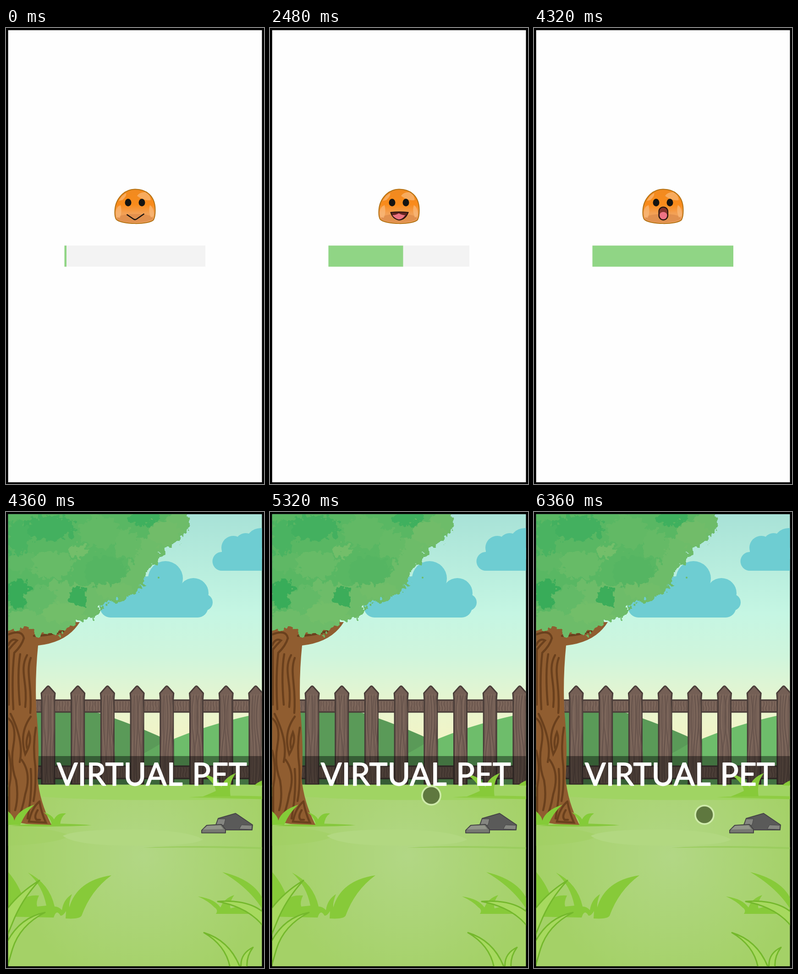
An HTML page for the animation above (6.4 s loop, 563 by 994 pixels).

```html
<!DOCTYPE html>
<html lang="en">
<head>
<meta charset="utf-8">
<title>Virtual pet</title>
<style>
html, body { margin: 0; width: 100%; height: 100%; overflow: hidden; background: #000; }
svg { display: block; width: 563px; height: 994px; }
.title { font: 400 67px Lato, "Open Sans", sans-serif; letter-spacing: .4px; word-spacing: 5px; }
</style>
</head>
<body>
<svg viewBox="0 0 563 994">
  <defs>
    <clipPath id="screen"><rect x="4.7" y="4.7" width="553.8" height="985.5"/></clipPath>
    <linearGradient id="sky" x1="0" y1="5" x2="0" y2="520" gradientUnits="userSpaceOnUse">
      <stop stop-color="#a8e2d7"/><stop offset=".42" stop-color="#c5f6e3"/>
      <stop offset=".6" stop-color="#cff5dc"/><stop offset=".8" stop-color="#e8f5cf"/><stop offset="1" stop-color="#f5f4c4"/>
    </linearGradient>
    <radialGradient id="lawn" cx="300" cy="750" r="290" gradientUnits="userSpaceOnUse">
      <stop stop-color="#b2d785"/><stop offset="1" stop-color="#a4d167"/>
    </radialGradient>
    <linearGradient id="skin" x1="0" y1="0" x2="0" y2="1">
      <stop stop-color="#f08a20"/><stop offset=".45" stop-color="#f98b1b"/>
      <stop offset=".7" stop-color="#f3a054"/><stop offset="1" stop-color="#efa565"/>
    </linearGradient>
    <filter id="leafy" x="-10%" y="-10%" width="120%" height="120%" color-interpolation-filters="sRGB">
      <feTurbulence type="fractalNoise" baseFrequency=".08" numOctaves="3" seed="4"/>
      <feDisplacementMap in="SourceGraphic" scale="32" xChannelSelector="R" yChannelSelector="G"/>
    </filter>
  </defs>

  <g clip-path="url(#screen)">
    <g id="loader">
      <rect width="563" height="994" fill="#fefefe"/>
      <rect x="127.5" y="474.3" width="307.5" height="46" fill="#f3f3f3"/>
      <rect id="fill" x="127.5" y="474.3" height="46" fill="#90d585"/>
      <path d="M237.5 400C238 372 258 352 281 351.500C306 351 325 366 325.500 395Q326 410 322 418C312 429 252 429 240.500 417Q237 411 237.500 400Z" fill="url(#skin)" stroke="#b47214" stroke-width="2"/>
      <path d="M242 416Q244 406 281 405.500Q318 405 321 416C308 427 254 427 242 416Z" fill="#dd8b4a" opacity=".75"/>
      <path d="M240 402Q240 390 250 386Q254 402 248 414L241 412ZM314 386Q324 392 322 410L316 413Q310 398 314 386ZM246 377Q253 364 262 360Q264 366 254 375ZM286 366Q292 357 304 358Q315 363 316 375Q302 378 286 366Z" fill="#fbbd80" opacity=".65"/>
      <ellipse cx="266.5" cy="380.500" rx="7" ry="8.200" fill="#141412"/>
      <ellipse cx="296.5" cy="380.500" rx="7" ry="8.200" fill="#141412"/>
      <g class="mouth"><path d="M263.5 406.500L279 417Q282 418.500 285 416.500L301.500 405" fill="none" stroke="#1b1510" stroke-width="2.600"/></g>
      <g class="mouth">
        <path d="M263.5 402Q282 400 301.500 402Q295 418 281 418.500Q268 416 263.500 402Z" fill="#652420" stroke="#23130e" stroke-width="2"/>
        <path d="M267 408Q274 408 281 404Q288 408 295 408Q289 417 281 417.500Q272 415 267 408Z" fill="#ec7382"/>
      </g>
      <g class="mouth">
        <rect x="272.5" y="390.300" width="19.500" height="28" rx="9.700" fill="#83332b" stroke="#24150f" stroke-width="2.200"/>
        <path d="M274 408Q275 401 282 401Q289 401 290.500 408Q290 416.500 282 417Q275 416.500 274 408Z" fill="#ee7385"/>
      </g>
    </g>

    <g id="garden">
      <rect width="563" height="600" fill="url(#sky)"/>
      <g fill="#6ecdd2">
        <circle cx="348" cy="145" r="38"/><circle cx="312" cy="172" r="32"/><circle cx="409" cy="177" r="33"/>
        <circle cx="433" cy="197" r="18"/><rect x="205" y="168" width="236" height="62" rx="23"/>
        <circle cx="471" cy="107.500" r="20.500"/><circle cx="496" cy="78" r="26"/><circle cx="523" cy="69" r="23"/>
        <circle cx="556" cy="69" r="34"/><rect x="471" y="78" width="100" height="50"/>
      </g>
      <path d="M60 425Q150 420 205 439Q276 462 352 497V600H60Z" fill="#5a9a58"/>
      <path d="M300 527Q400 470 563 437V600H300Z" fill="#6ebd6b"/>
      <path d="M296 530L344 501L368 497V600H296Z" fill="#62a95f"/>
      <g id="fence"></g>
      <rect x="65" y="532" width="500" height="64" opacity=".4"/>

      <rect y="594.500" width="563" height="400" fill="url(#lawn)"/>
      <path d="M0 594.500H563V626Q330 629 220 627Q130 625 70 620H0Z" fill="#a0d463"/>
      <path d="M0 684Q100 688 140 705Q120 722 0 728Z" fill="#a2d165" opacity=".6"/>
      <path d="M124 706Q150 692 278 692Q400 694 430 714Q405 728 290 727Q155 729 124 706Z" fill="#b2d881"/>
      <path d="M298 732Q400 725 563 731V735Q430 730 298 732Z" fill="#9bcd5f"/>
      <path d="M398 622Q470 616 563 620V626Q480 624 398 622Z" fill="#8fcd43"/>
      <g fill="#87ca39">
        <path d="M428 571Q460 575 470 601Q475 579 502 569Q485 590 490 620H430Q450 612 458 608Q455 589 428 571ZM542 596Q550 588 563 584V597Z"/>
        <path d="M5 785Q30 815 38 845Q48 834 72 836Q65 850 68 860L88 858Q80 815 48 786Q95 810 106 860Q115 860 122 868Q125 845 144 833Q137 850 138 862Q155 803 230 792Q185 825 165 880Q160 888 130 886L131 870Q125 880 119 880Q110 864 104 884L5 882Z"/>
        <path d="M419 838Q455 843 468 862Q476 842 498 835Q486 852 490 864Q508 858 523 863L558 867V876H458Q464 868 455 862Q442 848 419 838ZM472 785Q545 802 563 850V872Q535 822 472 785Z"/>
      </g>
      <g fill="#a7d95f" stroke="#74b82c" stroke-width="3" stroke-linejoin="round">
        <path d="M2 866Q30 829 73 803Q34 845 14 896L2 925ZM2 938Q30 884 85 873Q30 901 14 953L2 994Z"/>
        <path d="M462 849Q530 844 563 874V905Q530 862 462 849ZM432 917Q488 934 511 993H489Q480 945 432 917ZM539 949Q510 963 513 993H526Q524 969 539 949Z"/>
      </g>

      <g stroke="#464646" stroke-width="2" stroke-linejoin="round">
        <path d="M455 690L463 668L501 657L538 682L537 693H470Z" fill="#5a5a59"/>
        <path d="M457 687L463 669L479 669L476 682ZM509 691L514 682L537 683L536 692Z" fill="#858681" stroke-width="1"/>
        <path d="M427 694L438 683L470 681L479 692V699.500H427Z" fill="#767871"/>
        <path d="M430 692L439 684L468 683L474 691Z" fill="#92958a" stroke="none"/>
      </g>

      <path d="M8 684Q100 675 187 683Q100 688 8 684Z" fill="#86c83d"/>
      <path d="M0 240H161Q134 284 70 291Q63 360 66 430Q74 510 69 580Q73 630 99 682L45 680L0 672Z" fill="#905d30"/>
      <g fill="none" stroke="#6a401d" stroke-width="4.500" stroke-linecap="round">
        <path d="M5 267Q35 255 39 275Q34 292 18 307Q12 360 16 430M5 290Q12 274 24 280Q14 290 6 300V420M61 270Q90 270 125 260"/>
        <path d="M46 312C28 345 48 370 42 425M54 318C42 350 58 380 53 438M31 310Q24 350 30 420"/>
        <path d="M5 450Q24 465 16 510Q9 550 22 585Q28 620 20 650M10 440Q40 500 30 545M54 446Q28 482 42 528Q58 500 50 480Q42 500 46 515"/>
        <path d="M65 470Q58 510 64 555Q66 600 60 630M34 540Q56 570 42 615Q36 650 25 672M5 520Q15 560 7 600V655M54 560Q58 610 47 668M73 631Q56 645 50 675L87 677Q77 655 73 631M69 650Q60 665 67 671L74 671"/>
      </g>
      <path d="M2 650Q18 664 18 673Q25 650 62 638Q42 655 31 682H2ZM82 654Q100 660 105 670Q112 655 131 657Q119 665 118 682H100Q98 667 82 654Z" fill="#84cb38"/>

      <g filter="url(#leafy)">
        <path d="M-30 -30H392L402 28L382 58L350 82L330 95L334 112L304 126L305 157L268 186L218 200L195 228L158 238L120 264L72 271L52 254L-30 260Z" fill="#6dbc69"/>
        <path d="M-30 -30H350L354 40L290 60L262 142L180 160L100 150L45 215L-30 220Z" fill="#59b763"/>
        <g id="leaves"></g>
      </g>
      <circle cx="333" cy="143" r="2" fill="#6dbc69"/>
      <text class="title" x="318.5" y="596" text-anchor="middle" fill="#fff" stroke="#fff" stroke-width="1.800" stroke-linejoin="round">VIRTUAL PET</text>
    </g>
  </g>
  <g id="pointer">
    <circle r="22" fill="#d5efb3" opacity=".85"/>
    <circle r="18.300" fill="#5f783f"/>
  </g>
</svg>
<script>
const $ = id => document.getElementById(id);
const LOOP = 6400, GARDEN_AT = 4340, POINTER_AT = 4800;

let seed = 7;
const rand = (a, b) => {
  seed = seed * 16807 % 2147483647;
  return a + (b - a) * seed / 2147483647;
};

const grain = (x, y, h, sway) => {
  const s = rand(-sway, sway);
  return `M${x} ${y}q${s} ${h / 4} 0 ${h / 2}t0 ${h / 2}`;
};

function buildFence() {
  const edge = 'stroke="#493c38" stroke-width="3" stroke-linejoin="round"';
  const lines = (d, color) => `<path d="${d}" fill="none" stroke="${color}" stroke-width="2.2" opacity=".6"/>`;
  let out = '';
  for (const [y, h] of [[410, 26], [554, 27]]) {
    out += `<rect x="50" y="${y}" width="530" height="${h}" fill="#756056" ${edge}/>`;
    let light = '', dark = '';
    for (let x = 66; x < 560; x += 6) {
      light += grain(x, y + 3, h - 6, 3);
      dark += grain(x + 3, y + 3, h - 6, 3);
    }
    out += lines(light, '#877063') + lines(dark, '#66534a');
  }
  for (let i = 0; i < 8; i++) {
    const x = 92 + i * 64.7;
    out += `<path d="M${x - 15} 395L${x - 3} 381.500Q${x} 377.500 ${x + 3} 381.500L${x + 15} 395L${x + 14} 408V594H${x - 14}V408Z" fill="#745f55" ${edge}/>`;
    let light = '', dark = '';
    for (let k = -9; k <= 9; k += 6) {
      light += grain(x + k, 397, 194, 9);
      dark += grain(x + k + 2.5, 400, 190, 9);
    }
    out += lines(light, '#856e62') + lines(dark, '#604e46');
  }
  $('fence').innerHTML = out;
}

function buildLeaves() {
  const patches = [
    [95, 35, 55, 28, '#43b05f'], [25, 55, 25, 38, '#4ab361'], [300, 12, 34, 16, '#3fb05e'],
    [28, 178, 27, 32, '#38ac59'], [158, 186, 19, 22, '#3cad5a'], [100, 115, 48, 30, '#67bb67'],
    [215, 130, 45, 35, '#55b562'], [205, 45, 45, 35, '#62b965'], [265, 70, 28, 30, '#65ba66'],
    [75, 190, 35, 30, '#63ba67'], [30, 110, 32, 20, '#5fb865'], [125, 220, 50, 22, '#72be69'],
    [235, 172, 45, 17, '#71bd69'], [345, 45, 34, 28, '#71bc69'], [160, 85, 22, 12, '#73be6a']
  ];
  $('leaves').innerHTML = patches.map(([x, y, rx, ry, c]) =>
    `<ellipse cx="${x}" cy="${y}" rx="${rx}" ry="${ry}" fill="${c}"/>`).join('');
}

// Start time, bar width and mouth of each loading stage.
const stages = [[0, 4.5, 0], [980, 70, 0], [1700, 163, 1], [3080, 227, 1], [3760, 288, 2], [4200, 307.5, 2]];
const trail = [[POINTER_AT, 582, 645], [5280, 352, 618], [5320, 352, 618], [6360, 372, 660], [LOOP, 372, 660]];
const mouths = document.querySelectorAll('.mouth');

function pointerAt(t) {
  const i = trail.findIndex(p => p[0] > t);
  const [t0, x0, y0] = trail[i - 1], [t1, x1, y1] = trail[i];
  const u = (t - t0) / (t1 - t0), e = u * u * (3 - 2 * u);
  return [x0 + (x1 - x0) * e, y0 + (y1 - y0) * e];
}

const show = (el, on) => el.setAttribute('display', on ? 'inline' : 'none');

function draw(now) {
  const t = now % LOOP;
  const [, width, mouth] = stages.filter(s => s[0] <= t).pop();
  show($('loader'), t < GARDEN_AT);
  show($('garden'), t >= GARDEN_AT);
  show($('pointer'), t >= POINTER_AT);
  $('fill').setAttribute('width', width);
  mouths.forEach((m, i) => show(m, i === mouth));
  if (t >= POINTER_AT) $('pointer').setAttribute('transform', `translate(${pointerAt(t)})`);
}

buildFence();
buildLeaves();
const start = performance.now();
(function tick() {
  draw(performance.now() - start);
  requestAnimationFrame(tick);
})();
</script>
</body>
</html>
```
